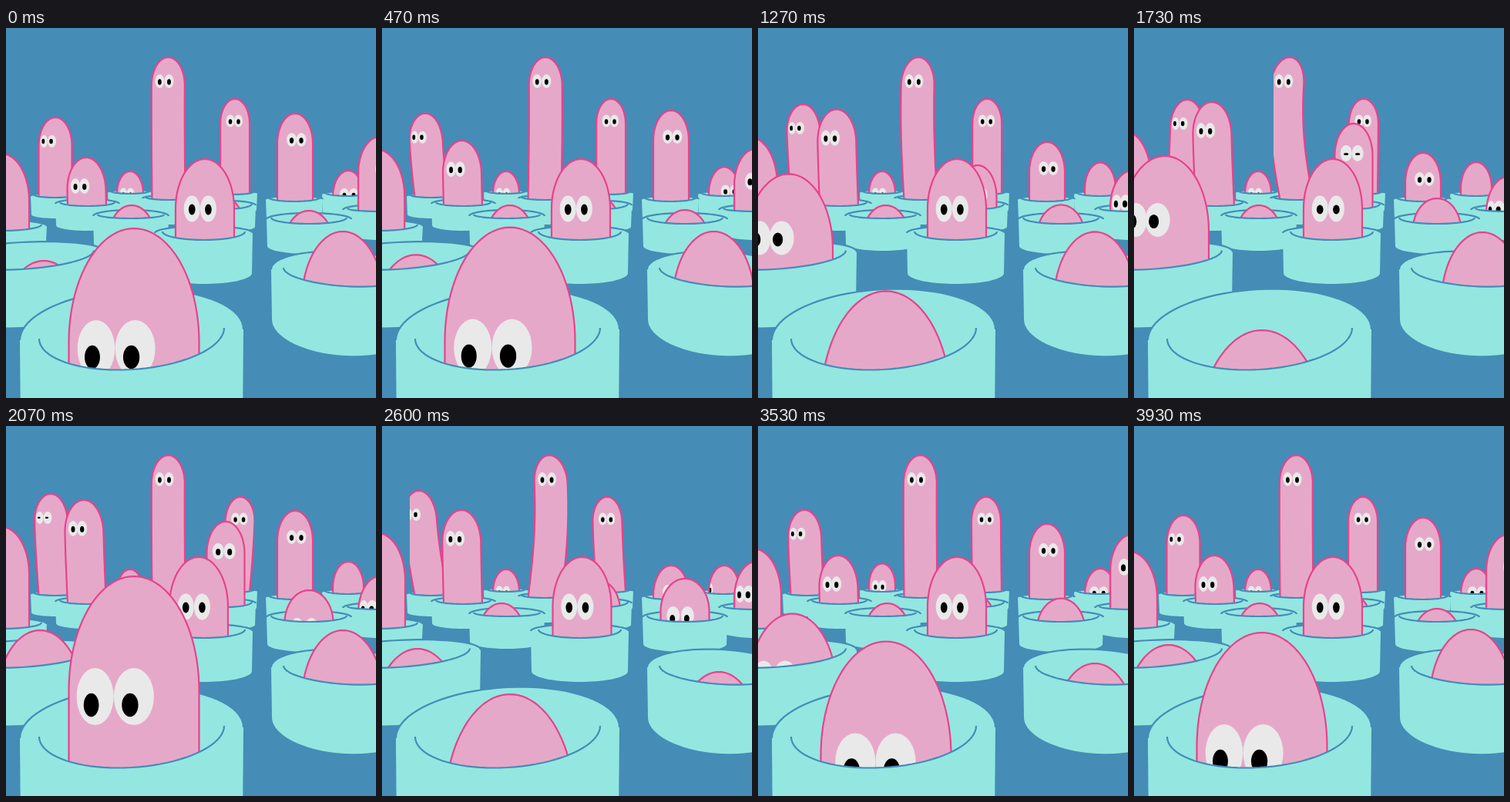
An HTML page with a canvas that plays this animation: 480 by 480 pixels, repeating every 3990 ms.

```html
<!DOCTYPE html>
<html lang="en">
<head>
<meta charset="utf-8">
<title>Worms in tubs</title>
<style>
html, body { margin: 0; height: 100%; overflow: hidden; background: #458cb7; }
canvas { display: block; width: 480px; height: 480px; }
</style>
</head>
<body>
<canvas id="stage" width="480" height="480"></canvas>
<script>
const ctx = document.getElementById('stage').getContext('2d');
const LOOP = 3990, STEPS = 60;
const SEA = '#458cb7', TUB = '#93e7e0', SKIN = '#e6a8c9', EDGE = '#e8428b', WHITE = '#e9e9e9';
const KEY_STEPS = [0, 13, 26, 31, 39, 47, 59];
let step = 0;

// Monotone curve through the key poses; a plain number stays constant.
// "edge" is the speed, per step, across the loop's seam.
function pose(keys, edge = 0) {
  if (!Array.isArray(keys)) return keys;
  const last = KEY_STEPS.length - 1;
  const secant = i => (keys[i + 1] - keys[i]) / (KEY_STEPS[i + 1] - KEY_STEPS[i]);
  const slope = i => {
    if (i === 0 || i === last) return edge;
    const a = secant(i - 1), b = secant(i);
    return a * b <= 0 ? 0 : 2 * a * b / (a + b);
  };
  let i = 0;
  while (i < last - 1 && step >= KEY_STEPS[i + 1]) i++;
  const span = KEY_STEPS[i + 1] - KEY_STEPS[i];
  const u = (step - KEY_STEPS[i]) / span, v = 1 - u;
  return keys[i] * v * v * (1 + 2 * u) + keys[i + 1] * u * u * (3 - 2 * u)
    + span * u * v * (slope(i) * v - slope(i + 1) * u);
}

function oval(x, y, rx, ry, color) {
  ctx.beginPath();
  ctx.ellipse(x, y, rx, ry, 0, 0, 2 * Math.PI);
  ctx.fillStyle = color;
  ctx.fill();
}

// Adds half an ellipse from x0 to x1 to the path; tilt raises its right end.
function halfOval(x0, x1, y, ry, tilt) {
  const cx = (x0 + x1) / 2, rx = (x1 - x0) / 2;
  for (let i = 0; i <= 40; i++) {
    const a = Math.PI * i / 40, c = Math.cos(a);
    ctx.lineTo(cx - rx * c, y + ry * Math.sin(a) + tilt / 2 * c);
  }
}

function worm(lip, w) {
  const { x, half, round = 1.7, bend = 0, wave = 0, eyes } = w;
  const top = pose(w.top, Array.isArray(w.top) ? w.top[0] - w.top[6] : 0);
  if (top > lip + 4) return;
  const sway = pose(w.sway || 0), dome = half * round;
  const center = y => {
    if (!bend) return x + sway;
    const u = Math.max(0, (lip - y) / (lip - top));
    return x + sway * (Math.sin(Math.PI * u / 2) + wave * Math.sin(Math.PI * u));
  };
  const left = [], right = [];
  const add = (y, r) => {
    left.unshift([center(y) - r, y]);
    right.push([center(y) + r, y]);
  };
  for (let i = 0; i <= 24; i++) {
    const a = Math.PI * i / 48;
    add(top + dome * (1 - Math.cos(a)), half * Math.sin(a));
  }
  for (let y = top + dome + 4; y < lip + 8; y += 4) add(y, half);
  ctx.beginPath();
  for (const p of left.concat(right)) ctx.lineTo(...p);
  ctx.fillStyle = SKIN;
  ctx.fill();
  if (eyes) {
    ctx.save();
    ctx.clip();
    drawEyes(eyes, top, center, half, w);
    ctx.restore();
  }
  ctx.beginPath();
  for (const p of left.concat(right)) ctx.lineTo(...p);
  ctx.strokeStyle = EDGE;
  ctx.stroke();
}

// eyes: [drop below the top, gap between centers, rx, ry]
function drawEyes([drop, gap, rx, ry], top, center, half, { turn = 0, look = [0, 1], blink }) {
  const y = top + drop, spread = Math.asin(gap / 2 / half), angle = pose(turn);
  const open = blink === undefined ? 1 : Math.min(1, 0.35 + Math.abs(step - blink) / 3);
  for (const a of [angle - spread, angle + spread]) {
    const face = Math.cos(a);
    if (face <= 0) continue;
    const x = center(y) + half * Math.sin(a), width = Math.min(1, face + 0.12);
    oval(x, y, rx * width, ry, WHITE);
    oval(x + look[0], y + look[1], rx * 0.41 * width, ry * 0.41 * open, '#000');
  }
}

// tub: [left, right, rim y, rim ry, bottom y, bottom ry, inset, lip y, tilt]
function tub([x0, x1, y, ry, bottom, bottomRy, inset, lip, tilt = 0], inhabitant) {
  const in0 = x0 + inset, in1 = x1 - inset, inY = y - 2;
  ctx.lineWidth = 2.2;
  ctx.fillStyle = TUB;
  ctx.beginPath();
  halfOval(x0, x1, y, -ry, tilt);
  halfOval(x1 - 1, x0 + 1, bottom - bottomRy, bottomRy, -tilt);
  ctx.fill();
  // The second half above runs right to left, so the base bulges downwards.
  ctx.beginPath();
  halfOval(x0, x1, y, -ry, tilt);
  ctx.strokeStyle = SEA;
  ctx.stroke();

  ctx.save();
  ctx.beginPath();
  ctx.moveTo(in0, -50);
  halfOval(in0, in1, inY, lip - inY, tilt);
  ctx.lineTo(in1, -50);
  ctx.clip();
  worm(lip, inhabitant);
  ctx.restore();

  ctx.beginPath();
  halfOval(in0, in1, inY, lip - inY, tilt);
  ctx.strokeStyle = SEA;
  ctx.stroke();
}

function draw() {
  ctx.fillStyle = SEA;
  ctx.fillRect(0, 0, 480, 480);

  // Far row
  tub([262, 326, 214, 3, 240, 4, 4, 216], {
    x: 297, half: 19, top: 92, bend: 1, sway: [0, 0, 1, 7, -5, -3, 0],
    eyes: [28.5, 10.5, 5.5, 8], turn: -0.04 });
  tub([132, 190, 213, 3, 240, 4, 3, 215], {
    x: 161, half: 17, top: [186, 186, 186, 186, 186, 171, 186],
    eyes: [29.5, 9.5, 5, 8], turn: -0.25 });
  tub([32, 95, 218, 4, 247, 5, 4, 220], {
    x: 64, half: 21.5, top: [116, 104, 93, 88, 84, 97, 116], bend: 1,
    sway: [0, -14, 5, -6, -16, -10, 0],
    eyes: [31, 11.5, 5.5, 8], turn: -0.48, look: [-1, 0], blink: 31 });
  tub([410, 476, 215, 3, 245, 5, 3, 218], {
    x: 444, half: 20, top: [185, 176, 174, 176, 181, 185, 185],
    eyes: [31, 12, 6, 8], turn: [0.05, 0.95, 3, 3.6, 4.85, 5.87, 6.33] });
  tub([177, 245, 221, 4, 255, 5, 4, 223], {
    x: 211, half: 21.5, top: 38, bend: 1, wave: 0.7,
    sway: [-0.5, 2, -9, -0.5, 6, -0.5, -0.5],
    eyes: [31, 12.5, 6, 9], turn: -0.24 });
  tub([337, 411, 222, 4, 252, 5, 4, 225], {
    x: 375, half: 23, top: [111, 131, 162, 110, 181, 111, 119],
    eyes: [34, 12.5, 6.5, 9], turn: 0.08 });

  // Middle rows
  tub([246, 324, 230, 6, 264, 6, 5, 235], {
    x: 285, half: 24.5, top: [221, 221, 124, 124, 202, 221, 221],
    eyes: [38.5, 15, 7.5, 10.5], turn: -0.1, blink: 26 });
  tub([64, 147, 228, 6, 263, 7, 6, 231], {
    x: 105, half: 25, top: [168, 121, 96, 96, 109, 168, 168], bend: 1,
    sway: [-1, -2, -4, -4, -2, -1, -1],
    eyes: [37, 12.5, 6.5, 10], turn: -0.36 });
  tub([-65, 53, 257, 8, 284, 8, 7, 263], {
    x: -6, half: 36, top: [163, 150, 133, 131, 139, 152, 163],
    sway: [0, -2, -8, 0, 0, 0, 0],
    eyes: [55, 22, 10, 15], turn: [-1, -0.05, -1, -1, -1, -1, -1] });
  tub([437, 535, 236, 7, 275, 10, 6, 238], {
    x: 485, half: 28, top: [141, 175, 193, 195, 176, 141, 141],
    eyes: [42, 13.5, 7.5, 11], turn: [0.3, -0.33, -0.66, -0.6, -0.58, -0.56, 0.3],
    look: [-1, 1], blink: 47 });
  tub([113, 211, 244, 8, 289, 9, 6, 247], {
    x: 163, half: 29, round: 1.35, top: 230, sway: [0, 5, -1, -2, -8, 9, 0] });
  tub([338, 448, 248, 8, 293, 10, 6, 254], {
    x: 393, half: 31.5, round: 1.35, top: [237, 234, 221, 213, 198, 206, 237],
    eyes: [48, 19, 8.5, 12], turn: -0.2, look: [-1, 4] });
  tub([193, 320, 266, 9, 332, 14, 10, 275], {
    x: 258, half: 38, top: 170, sway: [0, 0, 0, -8, 1.5, 0, 0],
    eyes: [64.5, 21.5, 10.5, 17], turn: -0.17, look: [0, 1], blink: 24.5 });

  // Near tubs
  tub([-88, 128, 296, 18, 388, 27, 14, 313, 11], {
    x: 44, half: 57, top: [302, 224, 166, 265, 289, 257, 284],
    sway: [5, -4, -4, 0, 2, 0, 1],
    eyes: [83, 31, 16, 22], turn: -0.44, look: [-5, 2] });
  tub([344, 536, 318, 28, 425, 42, 16, 335, -10], {
    x: 437, half: 53, top: [264, 264, 265, 265, 319, 352, 264],
    sway: [0, -12, 15, 0, 0, 0, 0] });
  tub([18, 308, 398, 59, 560, 40, 25, 443, 14], {
    x: 166, half: 84.5, round: 1.75, top: [260, 290, 392, 195, 348, 267, 268],
    eyes: [156, 53, 26, 37], turn: [-0.3, -0.28, -0.3, -0.32, -0.2, -0.04, -0.3],
    look: [-5, 11] });
}

function tick() {
  step = Math.floor(performance.now() % LOOP / LOOP * STEPS);
  draw();
  requestAnimationFrame(tick);
}
tick();
</script>
</body>
</html>
```
